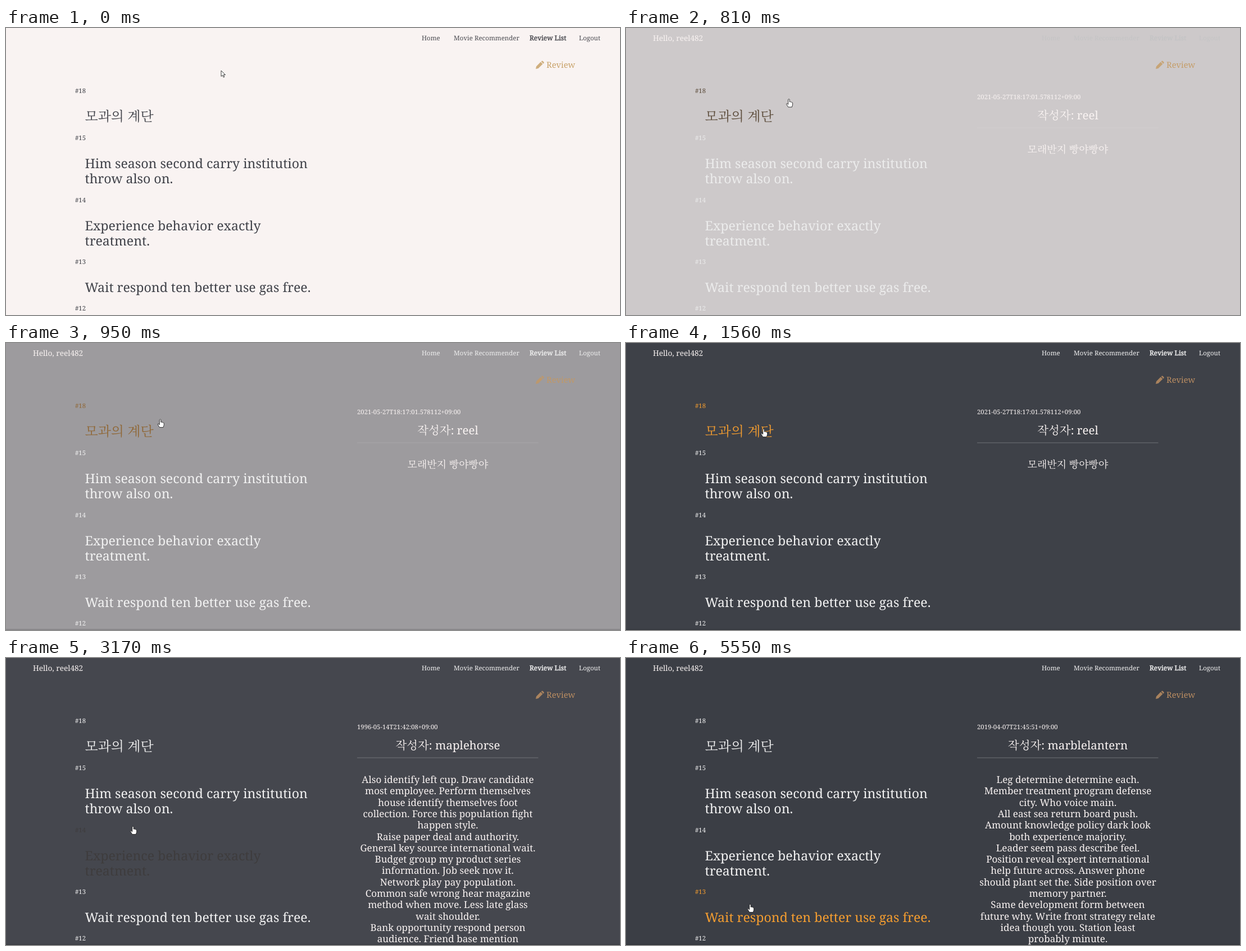
These frames come from a looping animation (1093 px wide and 512 px high, 6150 ms). An HTML page:

```html
<!DOCTYPE html>
<html lang="ko">
<head>
<meta charset="utf-8">
<title>Review List</title>
<style>
  html, body { margin: 0; width: 100%; height: 100%; overflow: hidden; background: #f9f3f2; }
  svg { display: block; width: 100%; height: 100%; }
  text { font-family: "Noto Serif", "Noto Serif CJK KR", "Noto Sans CJK KR", "Noto Sans CJK", serif; text-rendering: geometricPrecision; }
  #nav text { font-size: 11.5px; }
  #nav .current { font-size: 11.9px; stroke: currentColor; stroke-width: .45px; }
  #nav { fill: currentColor; }
  .number { font-size: 11.3px; }
  .title { font-size: 23.1px; font-weight: 300; }
  .hangul { font-size: 24px; }
  .light { fill: #f9f3f2; }
  #panel { text-anchor: middle; }
  #date { font-size: 11.3px; text-anchor: start; }
  #author { font-size: 20.5px; }
  #body { font-size: 17.1px; }
</style>
</head>
<body>
<svg viewBox="0 0 1093 512">
  <rect id="page" width="1093" height="512"/>
  <rect id="edge" y="510" width="1093" height="2" opacity=".13"/>
  <text class="light" x="48" y="23" font-size="13.6">Hello, reel482</text>
  <g id="nav">
    <text x="740" y="22">Home</text>
    <text x="797" y="22.4">Movie Recommender</text>
    <text class="current" x="932" y="22.4">Review List</text>
    <text x="1020" y="22">Logout</text>
  </g>
  <g id="write">
    <path opacity=".85" d="M943 73l1-4.6 7.8-7.8 3.6 3.6-7.8 7.8zM952.7 59.8l.9-.8q1-.8 2 0l1.8 1.8q.8 1 0 2l-.9.9z"/>
    <text x="962" y="71" font-size="14.7">Review</text>
  </g>
  <g id="list"></g>
  <g id="panel" class="light">
    <text id="date" x="625" y="127"></text>
    <text id="author" x="786.5" y="163"></text>
    <path id="rule" d="M625 178H947.5" stroke="#fff" stroke-opacity=".26"/>
    <g id="body"></g>
  </g>
  <g id="cursor" fill="#fff" stroke="#111" stroke-width=".8" stroke-linejoin="round">
    <path id="arrow" d="M0 0V10.4L2.5 8.1 4.2 12 5.9 11.2 4.2 7.5H7.5Z"/>
    <path id="hand" d="M-1.3 1Q0-.7 1.2 1V5.2L2.4 5 3.4 5.6 4.5 5.5 5.3 6.3Q6.6 6.2 6.6 7.6V10.5L5.3 14.6H-1.2L-4.2 9.9Q-4.9 8.3-3.6 8.1L-1.3 9.8Z"/>
  </g>
</svg>
<script>
const LOOP = 6150, FADE = 1150;
const PAPER = [249, 243, 242], SLATE = [59, 62, 69], INK = [64, 66, 73];
const WHITE = [242, 242, 242], ORANGE = [246, 158, 48];
const $ = id => document.getElementById(id);

const items = [
  { number: 18, y: 116, lines: ["모과의 계단"], titleY: 166, hangul: true, from: 630, to: 1840 },
  { number: 15, y: 200, lines: ["Him season second carry institution", "throw also on."], titleY: 250, from: 1840, to: 3100 },
  { number: 14, y: 310.5, lines: ["Experience behavior exactly", "treatment."], titleY: 360.5, from: 3100, to: 4570 },
  { number: 13, y: 420.5, lines: ["Wait respond ten better use gas free."], titleY: 470.5, from: 4570, to: LOOP },
  { number: 12, y: 504, lines: [], from: LOOP, to: LOOP }
];

const longReview = `Also identify left cup. Draw candidate
most employee. Perform themselves
house identify themselves foot
collection. Force this population fight
happen style.
Raise paper deal and authority.
General key source international wait.
Budget group my product series
information. Job seek now it.
Network play pay population.
Common safe wrong hear magazine
method when move. Less late glass
wait shoulder.
Bank opportunity respond person
audience. Friend base mention`;

const lastReview = `Leg determine determine each.
Member treatment program defense
city. Who voice main.
All east sea return board push.
Amount knowledge policy dark look
both experience majority.
Leader seem pass describe feel.
Position reveal expert international
help future across. Answer phone
should plant set the. Side position over
memory partner.
Same development form between
future why. Write front strategy relate
idea though you. Station least
probably minute.`;

const reviews = [
  { from: 670, date: "2021-05-27T18:17:01.578112+09:00", author: "reel", body: "모래반지 빵야빵야", size: 18 },
  { from: 1910, date: "1996-05-14T21:42:08+09:00", author: "maplehorse", body: longReview },
  { from: 3240, date: "1996-05-14T21:42:08+09:00", author: "softwagon", body: longReview },
  { from: 4640, date: "2019-04-07T21:45:51+09:00", author: "marblelantern", body: lastReview }
];

// Tracks are [time, value, ...] points joined by straight lines.
const darkness = [[560, 0], [740, .137], [880, .326], [1010, .62], [1150, .8], [1560, .984], [1700, 1],
  [1770, 1], [1850, .95], [2330, 1], [3030, 1], [3170, .95], [3520, 1]];
const navFade = [[560, 0], [740, .5], [880, .95], [1010, 1]];
const listFade = [[530, 0], [670, .9], [880, 1]];
const path = [[460, 383, 76], [740, 302, 119], [880, 278, 134], [1560, 245, 153], [1840, 240, 187],
  [2330, 235, 212], [2890, 230, 258], [3170, 226, 300], [3590, 225, 322], [4150, 224, 366],
  [4500, 223.5, 407], [4850, 222.5, 424], [5550, 221, 439]];
const arrowSpans = [[0, 600], [1770, 1840], [3030, 3100], [4430, 4570]];

function sample(track, t) {
  const i = track.findIndex(point => point[0] > t);
  if (i === 0) return track[0].slice(1);
  if (i < 0) return track[track.length - 1].slice(1);
  const a = track[i - 1], b = track[i], k = (t - a[0]) / (b[0] - a[0]);
  return a.slice(1).map((v, n) => v + (b[n + 1] - v) * k);
}

const mix = (a, b, k) => `rgb(${a.map((v, i) => Math.round(v + (b[i] - v) * k))})`;

// cubic-bezier(.25, .1, .25, 1)
function ease(x) {
  if (x >= 1) return 1;
  let low = 0, high = 1;
  const curve = (s, a, b) => 3 * s * (1 - s) * (1 - s) * a + 3 * s * s * (1 - s) * b + s ** 3;
  for (let i = 0; i < 20; i++) {
    const mid = (low + high) / 2;
    if (curve(mid, .25, .25) < x) low = mid; else high = mid;
  }
  return curve(low, .1, 1);
}

function addText(parent, x, y, content, className = "") {
  const el = document.createElementNS("http://www.w3.org/2000/svg", "text");
  el.setAttribute("x", x);
  el.setAttribute("y", y);
  el.setAttribute("class", className);
  el.textContent = content;
  parent.append(el);
}

for (const item of items) {
  item.group = document.createElementNS("http://www.w3.org/2000/svg", "g");
  addText(item.group, 123, item.y, "#" + item.number, "number");
  item.lines.forEach((line, i) =>
    addText(item.group, 140.5, item.titleY + i * 27.3, line, item.hangul ? "title hangul" : "title"));
  $("list").append(item.group);
}

let shown;
function showReview(review) {
  if (review === shown) return;
  shown = review;
  $("panel").style.display = review ? "" : "none";
  if (!review) return;
  $("date").textContent = review.date;
  $("author").textContent = "작성자: " + review.author;
  $("body").replaceChildren();
  $("body").style.fontSize = review.size ? review.size + "px" : "";
  review.body.split("\n").forEach((line, i) => addText($("body"), 786.5, 223 + i * 20.3, line));
}

function snap(t) {
  if (t < 460) return 0;
  if (t >= 5550) return 5550;
  const origin = t < 1000 ? 460 : 1560;
  return origin + Math.floor((t - origin) / 70) * 70;
}

function itemColor(item, t) {
  if (t >= item.from && t < item.to) return mix([54, 56, 62], ORANGE, ease((t - item.from) / FADE));
  return mix(INK, WHITE, sample(listFade, t)[0]);
}

function draw(now) {
  const t = snap(now % LOOP);
  const [dark] = sample(darkness, t);
  $("page").style.fill = mix(PAPER, SLATE, dark);
  $("edge").style.display = t < 880 ? "none" : "";
  $("nav").style.color = mix([74, 74, 80], WHITE, sample(navFade, t)[0]);
  $("write").style.fill = mix([200, 161, 104], [188, 142, 98], dark);
  $("rule").style.opacity = dark;
  for (const item of items) item.group.style.fill = itemColor(item, t);
  showReview(reviews.filter(review => t >= review.from).pop() || null);

  const [x, y] = sample(path, t);
  const pointing = !arrowSpans.some(([from, to]) => t >= from && t < to);
  $("cursor").setAttribute("transform", `translate(${x} ${y})`);
  $("hand").style.display = pointing ? "" : "none";
  $("arrow").style.display = pointing ? "none" : "";
}

showReview(null);
$("panel").style.display = "none";
const start = performance.now();
function tick() {
  draw(performance.now() - start);
  requestAnimationFrame(tick);
}
tick();
</script>
</body>
</html>
```
